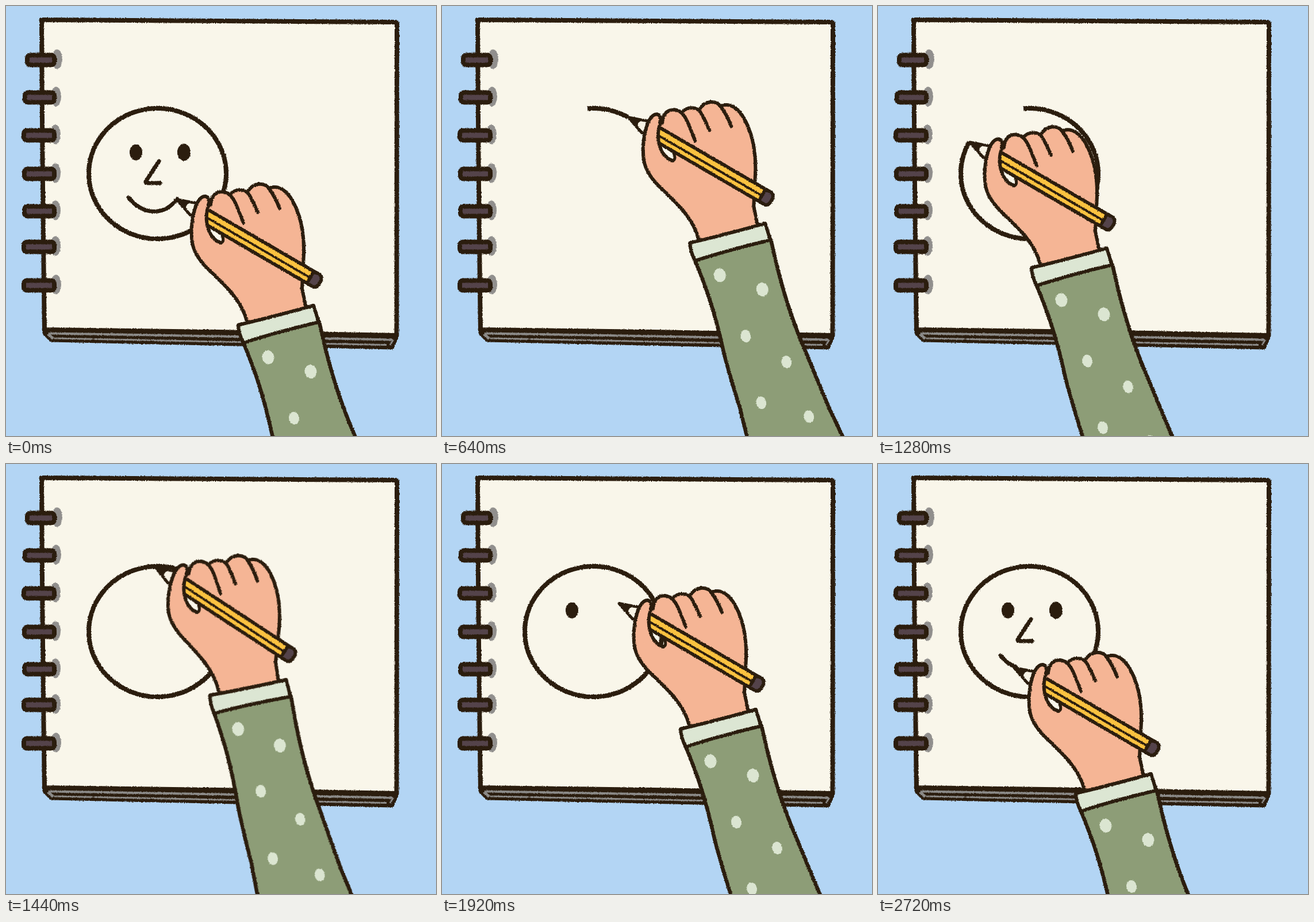
An HTML page for the animation above (2880 ms loop, 748 px wide and 748 px high).

```html
<!DOCTYPE html>
<html lang="en">
<head>
<meta charset="utf-8">
<title>Drawing a face</title>
<style>
  html, body { margin: 0; width: 100%; height: 100%; overflow: hidden; background: #b3d5f4; }
  svg { display: block; width: 100vw; height: 100vh; }
  .ink { fill: none; stroke: #2b1d0e; stroke-linecap: round; stroke-linejoin: round; }
</style>
</head>
<body>
<svg viewBox="0 0 748 748">
  <defs>
    <filter id="grain" x="-5%" y="-5%" width="110%" height="110%" color-interpolation-filters="sRGB">
      <feTurbulence type="fractalNoise" baseFrequency="0.5" numOctaves="2" seed="4"/>
      <feDisplacementMap in="SourceGraphic" scale="3" xChannelSelector="R" yChannelSelector="G"/>
    </filter>
  </defs>
  <rect width="748" height="748" fill="#b3d5f4"/>

  <g filter="url(#grain)">
    <path class="ink" stroke-width="5" style="fill:#2b1d0e" d="M65 562L67 571L79 582L672 595L680 577L679 571Z"/>
    <g fill="none" stroke="#8b8a88" stroke-width="4">
      <path d="M76 569.5L400 575L672 580.5"/>
      <path d="M73 570L82 579" stroke-width="5"/>
      <path d="M84 578L400 584.5L662 589.5" stroke-width="3"/>
      <path d="M674 580L668 590" stroke-width="3"/>
    </g>
    <path class="ink" stroke-width="8" style="fill:#f9f6ea" d="M62 24L370 26L678 28Q681 29 680 34L679.5 573L370 567L67 563Q63 290 62 24Z"/>
    <g id="rings"></g>
  </g>

  <g filter="url(#grain)">
    <path id="head" class="ink" stroke-width="8" style="stroke-linecap:butt"/>
    <ellipse id="eyeL" cx="226" cy="254.5" rx="11" ry="14" fill="#2b1d0e"/>
    <ellipse id="eyeR" cx="309.5" cy="254.5" rx="11.5" ry="15" fill="#2b1d0e"/>
    <path id="nose" class="ink" stroke-width="7"/>
    <path id="mouth" class="ink" stroke-width="7"/>
  </g>

  <g id="arm">
    <g filter="url(#grain)">
      <path fill="#f5b595" fill-rule="evenodd" d="M376 395C367 358 342 333 312 305C290 284 280 266 280 245C280 215 288 176 304 175L312 188
        C315 166 338 161 349 171C357 161 373 161 379 166C386 151 408 151 416 161C433 155 447 168 455 182C468 205 476 235 475 275L472 335L479 368Z
        M308 221C310 238 320 253 331 256C336 254 335 244 329 234Z"/>
      <g class="ink" stroke-width="6">
        <path d="M376 392C367 358 342 333 312 305C290 284 280 266 280 245"/>
        <path d="M313 190C313 177 320 167 334 167C348 169 353 180 358 191Q364 206 370 221"/>
        <path d="M350 169C358 162 373 162 380 172Q388 186 395 203"/>
        <path d="M379 165C387 151 407 150 415 162Q426 178 433 196"/>
        <path d="M417 160C433 155 447 168 455 182C468 205 476 235 475 275L472 335L478 365"/>
      </g>

      <g transform="translate(254 180.5) rotate(30.2)">
        <path class="ink" stroke-width="5" style="fill:#f7f2e4" d="M0 0L33 -11.5L46 -4L46 4L34 11.5Z"/>
        <path class="ink" stroke-width="3" style="fill:#2b1d0e" d="M0 0L21 -8L18 0L21 8Z"/>
        <path d="M44 -12H270V12H44Z" fill="#fbc240"/>
        <path d="M270 -12H281Q288 -11 288 0Q288 11 281 12H270Z" fill="#54434a"/>
        <path class="ink" stroke-width="4" d="M50 1H268"/>
        <path class="ink" stroke-width="6" d="M44 -12H281Q288 -11 288 0Q288 11 281 12H44M269 -12V12"/>
      </g>

      <path class="ink" stroke-width="6" style="fill:#f5b595" d="M280 247C278 215 287 178 302 175C311 175 312 185 307 199C303 218 308 248 331 256"/>
      <path class="ink" stroke-width="5" d="M331 256C337 254 335 246 331 239"/>

      <path fill="#8d9d77" d="M370 430C385 466 402 508 420 590C430 630 440 660 448 686L471 780L648 780L603 686L564 592C536 528 518 468 502 394Z"/>
      <g id="dots" fill="#dbe5d1"></g>
      <path class="ink" stroke-width="6.5" d="M370 430C385 466 402 508 420 590C430 630 440 660 448 686L471 780M648 780L603 686L564 592C536 528 518 468 502 394"/>
      <path class="ink" stroke-width="6" style="fill:#dce6d3" d="M361 399Q428 383 492 365L501 394Q434 409 370 430Q362 415 361 399Z"/>
    </g>
  </g>
</svg>
<script>
const $ = id => document.getElementById(id);
const STEP = 160, LOOP = 2880, START = -95, FULL = 268;
const HOME = [253, 180];

// left end, middle height, shadow x
const rings = [[33, 94, 89], [29, 159, 87], [27, 225, 86], [28, 292, 86], [28, 357, 86], [27, 419, 86], [27, 486, 87]];
$('rings').innerHTML = rings.map(([x, y, s]) =>
  `<ellipse cx="${s}" cy="${y - 1.5}" rx="9" ry="17" fill="#918f8d"/>
   <rect class="ink" x="${x + 4}" y="${y - 8.5}" width="${80 - x}" height="17" rx="5" stroke-width="8" style="fill:#54434a"/>`).join('');

const dots = [[413, 455], [487, 480], [458, 561], [529, 606], [485, 677], [568, 701], [526, 751]];
$('dots').innerHTML = dots.map(([x, y], i) =>
  `<ellipse cx="${x}" cy="${y}" rx="${i < 2 ? 10.5 : 8.8}" ry="${i < 2 ? 12 : 11}" transform="rotate(-12 ${x} ${y})"/>`).join('');

const rim = deg => {
  const a = deg * Math.PI / 180;
  return [263.5 + 119.5 * Math.cos(a), 291.5 + 113.5 * Math.sin(a)];
};

const noses = ['', 'M266 270Q252 291 244 306', 'M266 270Q252 291 243 306Q243 308 247 308L268 308'];
const mouths = ['', 'M213 333C220 342 228 349 240 353', 'M213 333C224 347 240 357.5 258 357.5C277 357.5 287 348 298 336'];

const stroke = deg => ({ tip: rim(deg), head: deg });
const pose = (x, y, eyes = 0, nose = 0, mouth = 0) => ({ tip: [x, y], head: FULL, eyes, nose, mouth });
const rest = pose(372, 412, 2, 2, 2);

const steps = [
  pose(296, 336, 2, 2, 2), rest, rest,
  { tip: HOME, head: START },
  stroke(-60), stroke(3), stroke(63.5), stroke(146), stroke(209),
  { ...pose(254, 183.5), turn: 3 },
  pose(225, 243), pose(225, 261, 1),
  pose(307, 242, 1), pose(309, 261, 2),
  pose(268, 273, 2), pose(244, 306, 2, 1), pose(270, 307, 2, 2),
  pose(236, 354, 2, 2, 1)
];

function headPath(end) {
  if (end <= START) return '';
  const pts = [];
  for (let a = START; a < end; a += 3) pts.push(rim(a));
  pts.push(rim(end));
  return 'M' + pts.map(p => p.map(v => v.toFixed(1)).join(' ')).join('L');
}

function show({ tip, head, eyes = 0, nose = 0, mouth = 0, turn = 0 }) {
  $('arm').setAttribute('transform',
    `translate(${tip[0] - HOME[0]} ${tip[1] - HOME[1]}) rotate(${turn} 360 262)`);
  $('head').setAttribute('d', headPath(head));
  $('eyeL').setAttribute('visibility', eyes > 0 ? 'visible' : 'hidden');
  $('eyeR').setAttribute('visibility', eyes > 1 ? 'visible' : 'hidden');
  $('nose').setAttribute('d', noses[nose]);
  $('mouth').setAttribute('d', mouths[mouth]);
}

let last = -1;
function tick() {
  const i = Math.floor(performance.now() % LOOP / STEP);
  if (i !== last) show(steps[last = i]);
  requestAnimationFrame(tick);
}
tick();
</script>
</body>
</html>
```
